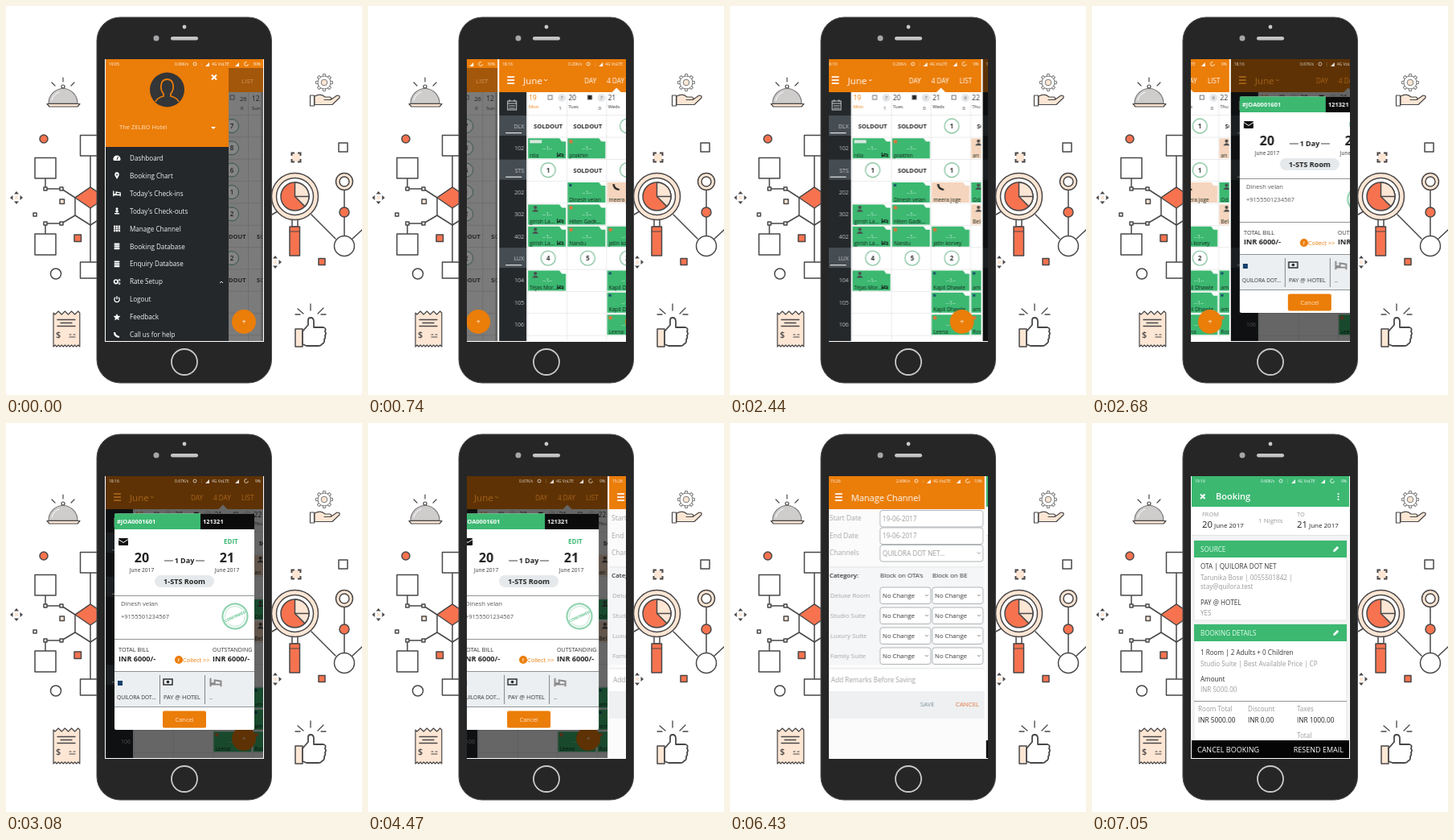
Write an HTML page that moves like this. It is 443 px wide and 483 px high and loops after 8000 ms.

```html
<!DOCTYPE html>
<html lang="en">
<head>
<meta charset="utf-8">
<title>Hotel app carousel</title>
<style>
html, body { margin: 0; width: 443px; height: 483px; overflow: hidden; background: #fff; }
body { position: relative; font-family: "Open Sans", "Noto Sans", sans-serif; }
svg { display: block; }
#scene { position: absolute; left: 0; top: 0; }
#screen { position: absolute; left: 123px; top: 66px; width: 198px; height: 351px; overflow: hidden; background: #fff; }
#track { position: absolute; left: 0; top: 0; }
#track > svg { position: absolute; top: 0; }
</style>
</head>
<body>
<svg id="scene" width="443" height="483"></svg>
<div id="screen"><div id="track"></div></div>
<script>
const ORANGE = '#eb7d09', GREEN = '#3cb871', DARK = '#24282b', GREY = '#9a9a9a', INK = '#333';
const PEACH = '#fde6d4', CORAL = '#f7734f', LINE = '#4a4748', SOFT = '#777';
const WIDTH = 198, LOOP = 8000;

// Drawing helpers
const rect = (x, y, w, h, fill, more = '') => `<rect x="${x}" y="${y}" width="${w}" height="${h}" fill="${fill}" ${more}/>`;
const circle = (x, y, r, fill, more = '') => `<circle cx="${x}" cy="${y}" r="${r}" fill="${fill}" ${more}/>`;
const path = (d, fill = 'none', stroke = 'none', w = 1, more = '') =>
  `<path d="${d}" fill="${fill}" stroke="${stroke}" stroke-width="${w}" ${more}/>`;
const text = (x, y, s, size, fill = INK, anchor = 'start', weight = 400) =>
  `<text x="${x}" y="${y}" font-size="${size}" fill="${fill}" text-anchor="${anchor}" font-weight="${weight}">${s}</text>`;
const at = (x, y, body, more = '') => `<g transform="translate(${x} ${y}) ${more}">${body}</g>`;
const outline = (d, fill = '#fff', w = 1.5, c = LINE) => path(d, fill, c, w, 'stroke-linejoin="round" stroke-linecap="round"');
const box = (x, y, w, h, fill = '#fff') => outline(`M${x} ${y}h${w}v${h}h${-w}z`, fill);
const ring = (x, y, r, fill = '#fff', w = 1.5, c = LINE) => circle(x, y, r, fill, `stroke="${c}" stroke-width="${w}"`);
const each = (list, fn) => list.map(fn).join('');
const range = n => [...Array(n).keys()];

const bed = (x, y, c, k = 1) => at(x, y, path('M-5-4V4M-5 2H5V4M5 2V-1L-1-2V1H-5M-3.4-1.6h.2', 'none', c, 1.5), `scale(${k})`);
const burger = (c = '#fff') => each([88, 92, 96], y => rect(134, y - .8, 9, 1.7, c));
const addButton = () => circle(296, 392, 15, ORANGE) + text(296, 395, '+', 9, '#fff', 'middle');
const caret = (x, y, c, dy = 2) => path(`M${x - 2} ${y - dy / 2}l2 ${dy}l2 ${-dy}`, 'none', c, .9);

function status(time, speed, charge = '9%', c = '#fff') {
  return text(128, 74, time, 5, c) + text(210, 74, speed, 5, c) +
    ring(235, 72, 2, 'none', .8, c) + text(241, 74, '⋮', 5, c) +
    path('M248 75h5v-5zM285 75h5v-5z', c) + text(256, 74, '4G VoLTE', 5, c) +
    circle(299, 72, 2.4, 'none', `stroke="${c}" stroke-width=".8" stroke-dasharray="11 4"`) +
    text(317, 74, charge, 5, c, 'end');
}

function backdrop() {
  const bell = outline('M57 95l4 4M71 89v5M85 95l-4 4', 'none', 1.2) + ring(71, 100, 2, '#fff', 1.2) +
    outline('M53 121a18 18.500 0 0 1 36 0z', '#cfcccc', 1.2, SOFT) + outline('M57 117a14 14 0 0 1 9-10', 'none', 1, '#fff') +
    outline('M51 121.500h41l-3 3.500H54z', PEACH, 1.2);
  const teeth = each(range(8), i => `<g transform="rotate(${i * 45})">${outline('M-2-7l.5-3.500h3l.5 3.500z', '#fff', 1, SOFT)}</g>`);
  const gear = at(396, 95, teeth + ring(0, 0, 8, '#fff', 1, SOFT) + ring(0, 0, 3.8, PEACH, 1, SOFT)) +
    outline('M378.500 111h5v13h-5z', '#fff', 1.2) + outline('M384 112q8-4 13 1h6q3 1 1 3.500h-8h8l8-5.500q4 0 3 3l-9 8.500h-22z', PEACH, 1.2);
  const move = (x, y) => at(x, y, each([0, 90, 180, 270], a => `<g transform="rotate(${a})">${path('M-3-4.500L0-8L3-4.500z', LINE)}</g>`) +
    rect(-2, -2, 4, 4, PEACH));
  const net = outline('M49 214v13h20l17 11M49 283v-13h20l17-10M105 186v40M105 272v46', 'none') +
    outline('M105 225l19 13v22l-19 12l-19-12v-22z') + outline('M105 225l19 13l-19 13l-19-13z', CORAL) + outline('M105 251v21', 'none') +
    box(36, 188.5, 26, 25.5) + box(36, 283, 26, 26) + box(92.5, 160.5, 24, 25.5) + box(92.5, 318, 24, 20) +
    box(47, 225, 4, 4) + box(47, 268, 4, 4) + box(67, 225, 4, 4) + box(67, 268, 4, 4) +
    ring(47, 165, 5, CORAL) + ring(62, 332.5, 6.5) + box(67, 240, 5.5, 5.5, PEACH) + box(34, 257, 4, 4) + box(85, 284, 8.5, 8.5, CORAL);
  const zig = y => each(range(8), i => `l2 ${i % 2 ? -y : y}l2.1 ${i % 2 ? y : -y}`);
  const receipt = outline(`M59 381${zig(2)}V423${each(range(8), () => 'l-2 -2l-2.1 2')}z`, PEACH, 1.2) +
    outline('M64 389.500h22M68 393.500h14M64 397.500h22', 'none', 1.3) + text(62, 412, '$', 11, LINE, 'start', 600) +
    outline('M79 408h2M84 408h2M79 411h7', 'none', 1.2);
  const corner = each([0, 90, 180, 270], a => `<g transform="rotate(${a})">${path('M-5.500-2V-5.500H-2', 'none', LINE, 2)}</g>`);
  const right = at(361, 188, rect(-5, -5, 10, 10, PEACH) + corner) + box(414, 170, 11, 11) +
    outline('M421 228v58M430 290l14-13M380 259l30 30M331 259l12-7', 'none') + ring(421, 218, 10.5, PEACH) + ring(421, 218, 6) +
    ring(421, 256, 6, CORAL) + ring(421, 298, 12.5) + box(389, 313.5, 8, 8, CORAL);
  const lens = box(356, 265, 7, 9) + box(353, 274, 12.5, 36, CORAL) + outline('M353 280h12.500', 'none', 1.2) +
    ring(359.5, 236.5, 29, PEACH) + ring(359.5, 236.5, 23) + ring(359.5, 236.5, 17.5, CORAL) +
    outline('M359.500 236.500v-17.500a17.500 17.500 0 0 1 12.400 29.900z', PEACH) + outline('M359.500 236.500h17.500', 'none');
  const thumb = outline('M363 376l7 6M379 370v8M395 375l-7 7M360 383h6M392 383h6', 'none', 1.3) + box(360, 401, 9, 22, PEACH) +
    outline('M369 404l7-8V390q0-3 3-3q4 0 4 5v7h12q4 1 2 5q2 3 0 5q1 3-1 5q1 4-3 6q-1 2-4 2h-15l-5-2z', '#fff', 1.8);
  const phone = rect(113, 14, 217.5, 454, '#262627', 'rx="29" stroke="#4c4d50"') +
    circle(222, 26, 2.4, '#c9c9c9') + circle(187, 40, 3.5, '#a5a6a8') + rect(205, 38, 34, 4.4, '#c4c4c5', 'rx="2.2"') +
    ring(222, 442, 16, 'none', 1.8, '#c9c9cb');
  return bell + gear + move(13, 238) + move(335, 318) + net + receipt + right + lens + thumb + phone;
}

function menu() {
  const database = each([-4, -1.2, 1.6], y => rect(-3.5, y, 7, 2.2, '#fff', 'rx="1"'));
  const icons = [
    path('M-4 3a4.500 4.500 0 1 1 8 0z', '#fff') + path('M0 2l1.500-4', 'none', DARK, 1),
    path('M0 4L-2.500-.5a2.800 2.800 0 1 1 5 0z', '#fff') + circle(0, -1.5, 1, DARK),
    bed(0, 0, '#fff', .85),
    circle(0, -3, 1.5, '#fff') + path('M-3 3h6M0-2v4M-2 0h4', 'none', '#fff', 1.5),
    each(range(9), i => rect(-4 + i % 3 * 2.9, -4 + (i / 3 | 0) * 2.7, 2.3, 2.2, '#fff')),
    database, database,
    ring(-1.2, 0, 2.3, 'none', 1.7, '#fff') + ring(3, -2, 1, 'none', 1, '#fff') + ring(3, 2.3, 1, 'none', 1, '#fff'),
    path('M-1.800-2.500a3.200 3.200 0 1 0 3.600 0M0-4V0', 'none', '#fff', 1.3),
    path('M0-4.200l1.300 2.800l3 .4l-2.200 2.100l.6 3l-2.700-1.500l-2.700 1.500l.6-3l-2.200-2.100l3-.4z', '#fff'),
    path('M-3-3q0 5 6 6', 'none', '#fff', 2.2)
  ];
  const labels = ['Dashboard', 'Booking Chart', "Today's Check-ins", "Today's Check-outs", 'Manage Channel', 'Booking Database',
    'Enquiry Database', 'Rate Setup', 'Logout', 'Feedback', 'Call us for help'];
  const rooms = [7, 8, 6, 1, 2, 0, 2, 0];
  const grid = rect(277, 77, 44, 30, '#a3570a') + rect(277, 107, 44, 310, '#7b7b7b') + text(293, 96, 'LIST', 8, '#d09a60') +
    rect(279, 111, 5, 5, 'none', 'stroke="#333" stroke-width=".8"') + text(291, 118, '26', 7.5, '#222') + text(306, 118, '12', 8.5, '#222') +
    text(292, 129, '0', 6, '#222') + text(306, 129, 'Sun', 6, '#222') +
    each(range(11), i => rect(277, 135 + i * 27.35, 44, .8, '#6c6c6c')) + rect(301, 107, .8, 310, '#6c6c6c') +
    each(rooms, (n, i) => {
      const y = 149 + i * 27.35;
      return n ? ring(281, y, 8.5, '#858585', 1, '#365544') + text(281, y + 3, n, 8, '#222', 'middle', 600)
        : text(277, y + 3, 'DOUT', 7.5, '#222', 'start', 700) + text(312, y + 3, 'SC', 7.5, '#222', 'start', 700);
    }) + rect(317, 107, 3, 310, '#555', 'opacity=".6"') + addButton();
  return rect(124, 66, 197, 11, ORANGE) + grid + rect(124, 66, 153, 109, ORANGE) + rect(124, 175, 153, 242, DARK) + status('19:05', '0.06K/s', '30%') +
    circle(200.5, 104, 21.5, '#333537') +
    path('M186 119q2-5 10-7v-3q-4-5-3-11q1-7 7.500-7t7.500 7q1 6-3 11v3q8 2 10 7', 'none', ORANGE, 1.8) +
    path('M256 85.500l6 6M262 85.500l-6 6', 'none', '#fff', 2) + text(141, 153, 'The ZELBO Hotel', 7.6, '#ffe3c4') +
    path('M255 150h6l-3 3z', '#fff') +
    each(labels, (s, i) => at(138, 189 + i * 21.9, icons[i]) + text(154, 192 + i * 21.9, s, 8.15, '#f2f2f2')) + caret(268, 343, '#fff', -2);
}

const rowY = r => 149 + r * 27.35, colX = c => 160 + c * 49.2;
const FLAT = '#f5d5bd';
// row, column, guest, fill, marker
const stays = [
  [1, 0, 'nila', GREEN, 1], [1, 1, 'prakhin', GREEN, 2], [1, 3, 'an', FLAT, 3], [3, 1, 'Dinesh velan', GREEN, 0], [3, 2, 'meera joge', FLAT, 4],
  [3, 3, 'Od', GREEN, 3], [4, 0, 'girish La...', GREEN, 3], [4, 1, 'Hiten Gadk...', GREEN, 2], [4, 3, 'Bel', FLAT, 3],
  [5, 0, 'girish La...', GREEN, 3], [5, 1, 'Nandu', GREEN, 2], [5, 2, 'jatin korvey', GREEN, 2], [7, 0, 'Tejas Mor...', GREEN, 3],
  [7, 2, 'Kapil Dhawle', GREEN, 0], [7, 3, 'ami', GREEN, 0], [8, 2, 'Kapil Dhawle', GREEN, 0], [8, 3, 'ami', GREEN, 0],
  [9, 2, 'Leena', GREEN, 2], [9, 3, 'Rod', GREEN, 2]
];

function stay([r, c, name, fill, mark]) {
  const x = colX(c), y = rowY(r) - 12;
  const marks = [
    rect(x + 2, y + 2, 3, 3, '#174a6b'),
    rect(x + 2, y + 2, 15, 4, '#d7e8df'),
    rect(x + 2, y + 2, 4, 4, '#e0723c'),
    circle(x + 9, y + 3.5, 2, '#4c4c4c') + path(`M${x + 5} ${y + 9}q4-6 8 0z`, '#4c4c4c'),
    path(`M${x + 8} ${y + 2}q0 6 7 7`, 'none', '#222', 2.3)
  ];
  return path(`M${x} ${y}h39l3 4h5v21h-47z`, fill) + marks[mark] +
    (fill === GREEN ? text(x + 24, y + 15, '--1--', 6.5, '#d9f5e5', 'middle') : '') +
    text(x + 2, y + 23.5, name, 6.6, '#16281e') + (c === 0 ? bed(x + 40, y + 20.5, '#16281e', .7) : '');
}

const toolbar = c => burger(c) + text(154, 97, 'June', 11.5, c) + caret(182, 92, c) +
  text(230, 96, 'DAY', 8.2, c) + text(258, 96, '4 DAY', 8.2, c) + text(293, 96, 'LIST', 8.2, c);

function chart() {
  const rows = ['DLX', '102', 'STS', '202', '302', '402', 'LUX', '104', '105', '106'];
  const days = [['19', 'Mon', 7, 1], ['20', 'Tues', 7, 0], ['21', 'Weds', 6, 0], ['22', 'Thu', 7, 0]];
  const free = { 0: ['', '', 1, ''], 2: [1, '', 1], 6: [4, 5, 2] };
  const avail = each(Object.entries(free), ([r, list]) => each(list, (n, c) => {
    const x = colX(c) + 25, y = rowY(+r);
    return n ? ring(x, y, 9, '#fff', 1.4, '#8cc7a4') + text(x, y + 3, n, 8, INK, 'middle', 700)
      : text(x, y + 3, 'SOLDOUT', 7.5, '#222', 'middle', 700);
  }));
  return rect(124, 66, 197, 351, '#fff') + rect(124, 66, 197, 41, ORANGE) + path('M264 107.500l6-6l6 6z', '#fff') +
    each(range(5), c => rect(colX(c) - 1, 108, .7, 310, '#e3e3e3')) + each(range(11), r => rect(158, rowY(r) - 13.7, 163, .7, '#e3e3e3')) +
    each(days, ([n, d, k, v], c) => {
      const x = colX(c) + 1, tone = c ? INK : ORANGE;
      return text(x, 117, n, 8.5, tone) + text(x, 127, d, 5.8, tone) + rect(x + 24, 111, 5, 5, c === 1 ? '#222' : 'none', 'stroke="#555" stroke-width=".8"') +
        circle(x + 41, 114, 5, '#e4e6e8') + text(x + 41, 116.2, k, 6, '#666', 'middle') + text(x + 39, 129, v, 6, INK, 'middle');
    }) + rect(124, 107, 34, 310, DARK) +
    rect(134.5, 118, 11, 11, 'none', 'stroke="#ccc" stroke-width="1"') + path('M134 121h12M137 116v3M143 116v3M136 124h8M136 127h8', 'none', '#ccc', 1) +
    each(rows, (s, r) => {
      const y = rowY(r), type = r in free;
      return (type ? rect(124, y - 13, 34, 25, '#454d52') + rect(132, y + 8, 20, 1.2, '#e3e3e3') : '') + text(155, y + 3, s, 7, '#c6c9cb', 'end');
    }) + avail + each(stays, stay) + addButton();
}

function bill() {
  const edge = y => rect(135, y, 174, .9, '#85898c');
  const stamp = ring(0, 0, 15.5, '#fff', 2.2, '#8fd3ae') + ring(0, 0, 12.5, 'none', .8, '#b5e2c9') +
    rect(-14, -3.5, 28, 7, '#fff') + text(0, 1.8, 'CONFIRMED', 4.7, '#5fc28d', 'middle', 700);
  return chart() + rect(124, 66, 197, 351, '#000', 'opacity=".6"') +
    status('18:16', '0.67K/s', '9%', '#e8e0d8') + toolbar('#a8651c') +
    rect(135, 112.5, 174, 268.5, '#fff', 'rx="2"') + rect(135, 112.5, 107, 19.5, GREEN) + rect(242, 112.5, 67, 19.5, '#0b0b0b') +
    text(138, 125, '#JOA0001601', 7.5, '#fff', 'start', 700) + text(245, 125, '121321', 7.5, '#fff', 'start', 700) +
    rect(140, 143, 12, 9, '#111', 'rx="1"') + path('M140 144.500l6 4l6-4', 'none', '#fff', 1) + text(271, 150, 'EDIT', 8, GREEN, 'start', 700) +
    text(169, 172.5, '20', 16, '#222', 'middle', 700) + text(275, 172.5, '21', 16, '#222', 'middle', 700) +
    text(222, 174, '1 Day', 9, '#222', 'middle', 700) + rect(197, 170.5, 11, 1, '#444') + rect(236, 170.5, 11, 1, '#444') +
    text(169, 185, 'June 2017', 6.6, INK, 'middle') + text(275, 185, 'June 2017', 6.6, INK, 'middle') +
    rect(185, 189, 74, 15, '#e6e9eb', 'rx="7.5"') + text(222, 200, '1-STS Room', 9.1, '#222', 'middle', 700) +
    edge(214) + text(143, 227, 'Dinesh velan', 7.7, '#555') + text(143, 243, '+9155501234567', 7.5, '#555') +
    at(285, 240, stamp, 'rotate(-25)') +
    edge(268) + text(140, 284, 'TOTAL BILL', 7.4) + text(257, 284, 'OUTSTANDING', 7.1) +
    text(140, 296, 'INR 6000/-', 9.1, '#222', 'start', 700) + text(257, 296, 'INR 6000/-', 9.1, '#222', 'start', 700) +
    circle(215, 294, 5, ORANGE) + text(215, 296.5, '₹', 6, '#fff', 'middle') + text(220, 297, 'Collect &gt;&gt;', 7.4, ORANGE) +
    rect(135, 308, 174, 44, '#eceff1') + edge(308) + edge(352) + rect(191, 313, .9, 36, SOFT) + rect(247, 313, .9, 36, SOFT) +
    rect(139, 320, 6, 6, '#17406b') + rect(196, 318, 11, 7, 'none', 'stroke="#222" stroke-width="1.4"') + circle(201.5, 321.5, 1.8, '#222') +
    bed(261, 322, '#888', 1.3) + text(138, 343, 'QUILORA DOT...', 6.6) + text(196, 343, 'PAY @ HOTEL', 7.4) + text(253, 343, '..', 7.5) +
    rect(195, 357.5, 54, 21, ORANGE, 'rx="2"') + text(222, 370.5, 'Cancel', 7.4, '#ffe8cf', 'middle');
}

function channels() {
  const field = (x, y, w, s, c, size, drop) => rect(x, y, w, 20.5, '#fff', 'rx="3" stroke="#a9adb0" stroke-width=".9"') +
    text(x + 3, y + 13, s, size, c) + (drop ? caret(x + w - 5, y + 10, '#888') : '');
  return rect(124, 66, 197, 351, '#fbfbfb') + rect(124, 66, 197, 41, ORANGE) + status('15:26', '2.69K/s', '10%') + burger() +
    text(154, 97, 'Manage Channel', 11, '#fff') +
    each([['Start Date', '19-06-2017'], ['End Date', '19-06-2017'], ['Channels', 'QUILORA DOT NET...']], ([s, v], i) =>
      text(127, 121 + i * 21.5, s, 8.5, '#a5a5a5') + field(190, 108.5 + i * 21.5, 128, v, '#999', 8.2, i === 2)) +
    rect(124, 179, 197, 121, '#f5f6f7') + rect(124, 178.5, 197, .8, '#dcdfe1') + text(127, 192, 'Category:', 7.9, INK, 'start', 600) +
    text(190, 192, "Block on OTA's", 8) + text(255, 192, 'Block on BE', 8) +
    each(['Deluxe Room', 'Studio Suite', 'Luxury Suite', 'Family Suite'], (s, i) => {
      const y = 204 + i * 25;
      return text(128, y + 13, s, 7.9, '#a5a5a5') + each([190, 255], x => field(x, y, 63, 'No Change', INK, 7.8, true));
    }) + rect(124, 305, 197, 28, '#fff') + rect(124, 304.5, 197, .8, '#dcdfe1') + text(129, 322, 'Add Remarks Before Saving', 8.2, '#a0a0a0') +
    rect(124, 333, 197, 34, '#eef0f1') + text(240, 352, 'SAVE', 7.6, '#78909c') + text(284, 352, 'CANCEL', 7.8, '#e2713a');
}

function booking() {
  const bar = (y, s) => rect(127, y, 190, 21, GREEN) + text(135, y + 13.5, s, 8.1, '#e8fff2') +
    path(`M300 ${y + 14}l.6-2.600l4.500-4.500l2 2l-4.500 4.500z`, '#fff');
  const card = (y, h) => rect(127, y, 190, h, '#fff', 'stroke="#dedede" stroke-width=".8"');
  // y, text, colour
  const lines = [
    [181, 'OTA | QUILORA DOT NET', INK], [195, 'Tarunika Bose | 0055501842 |', GREY], [206, 'stay@quilora.test', GREY],
    [226, 'PAY @ HOTEL', INK], [239, 'YES', GREY], [288, '1 Room | 2 Adults + 0 Children', INK],
    [302, 'Studio Suite | Best Available Price | CP', GREY], [321, 'Amount', INK], [334, 'INR 5000.00', GREY]
  ];
  return rect(124, 66, 197, 351, '#f3f4f4') + rect(124, 66, 197, 38, GREEN) + status('19:16', '0.60K/s') +
    path('M135 88.500l5.500 5.500M140.500 88.500l-5.500 5.500', 'none', '#fff', 1.9) + text(154, 95, 'Booking', 11, '#fff', 'start', 600) +
    each([88, 91.5, 95], y => circle(306.5, y, 1.1, '#fff')) + rect(124, 104, 197, 35, '#fff') + rect(124, 139, 197, .8, '#dedede') +
    text(137, 116, 'FROM', 7.4, GREY) + text(255, 116, 'TO', 7.4, GREY) + text(207, 124, '1 Nights', 8, GREY) +
    each([[137, '20'], [255, '21']], ([x, d]) => text(x, 130, d, 11.3, '#222') + text(x + 15, 130, 'June 2017', 8, '#222')) +
    card(146, 99) + bar(146, 'SOURCE') + card(250, 170) + bar(250, 'BOOKING DETAILS') +
    each(lines, ([y, s, c]) => text(135, y, s, 8.1, c)) + rect(127, 345, 190, .8, SOFT) +
    each([[132, 'Room Total', 'INR 5000.00'], [194, 'Discount', 'INR 0.00'], [255, 'Taxes', 'INR 1000.00']], ([x, s, v]) =>
      text(x, 358, s, 8.1, GREY) + text(x, 372, v, 8.3, '#222')) + text(255, 391, 'Total', 8.1, GREY) +
    rect(124, 394, 197, 23, '#050505') + text(131, 409, 'CANCEL BOOKING', 9, '#fff') + text(313, 409, 'RESEND EMAIL', 9, '#fff', 'end');
}

// Each slide keeps a thin white margin around its content
const slide = (body, i) => `<svg width="${WIDTH}" height="351" viewBox="123 66 ${WIDTH} 351" style="left:${i * WIDTH}px">
  <rect x="123" y="66" width="${WIDTH}" height="351" fill="#fff"/>
  <svg x="124" y="66" width="196" height="350" viewBox="124 66 196 350">${body}</svg></svg>`;

document.getElementById('scene').innerHTML = backdrop();
const track = document.getElementById('track');
track.innerHTML = each([menu(), chart() + status('18:16', '0.20K/s') + toolbar('#fff'), bill(), channels(), booking()], slide);

// CSS "ease" evaluated at p
function ease(p) {
  if (p >= 1) return 1;
  const bezier = (a, b, s) => 3 * a * s * (1 - s) ** 2 + 3 * b * s * s * (1 - s) + s ** 3;
  let lo = 0, hi = 1;
  for (let i = 0; i < 30; i++) {
    const mid = (lo + hi) / 2;
    if (bezier(.25, .25, mid) < p) lo = mid; else hi = mid;
  }
  return bezier(.1, 1, lo);
}

// start of the glide, first visible step, last step, step count
const glides = [[436, 500, 1050, 8], [2407, 2440, 3080, 9], [4404, 4470, 5020, 8], [6412, 6430, 7050, 9]];
const key = (time, x) => ({ offset: time / LOOP, transform: `translateX(${-x}px)`, easing: 'step-end' });
const keys = [key(0, 0)];
glides.forEach(([start, first, last, steps], i) => {
  for (let k = 0; k < steps; k++) {
    const time = first + (last - first) * k / (steps - 1);
    keys.push(key(time, WIDTH * (i + ease(k === steps - 1 ? 1 : (time - start) / 600))));
  }
});
keys.push(key(LOOP, WIDTH * glides.length));
track.animate(keys, { duration: LOOP, iterations: Infinity });
</script>
</body>
</html>
```
